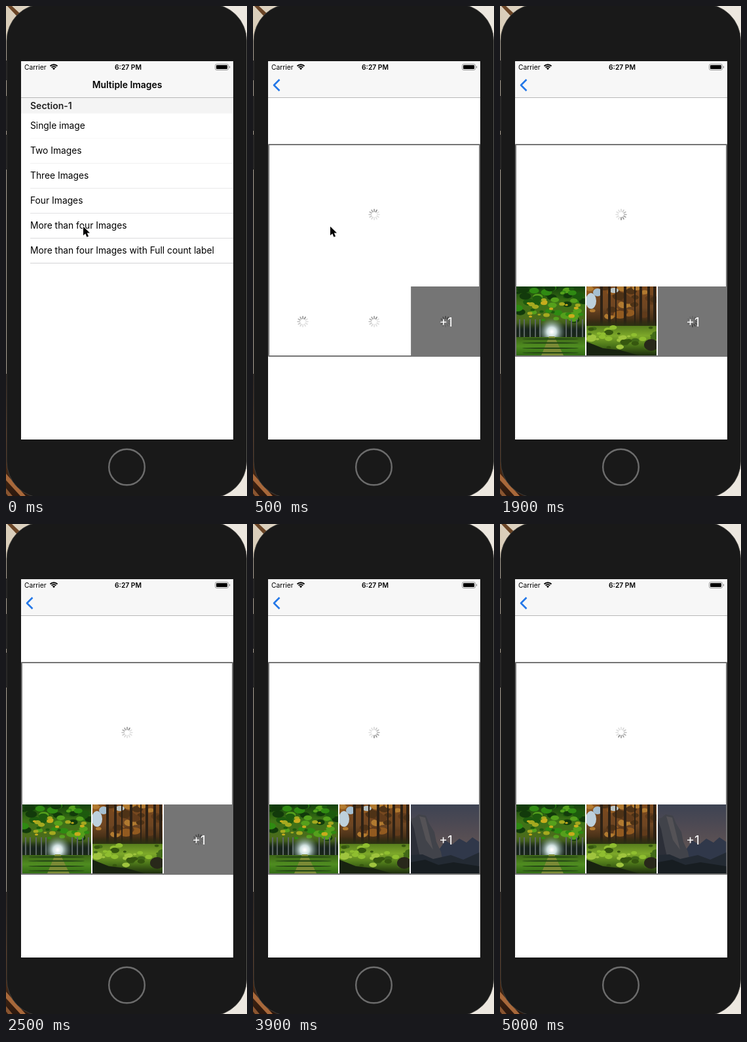
An HTML page with a canvas for the animation above (5100 ms loop, 368 px wide and 746 px high).

```html
<!DOCTYPE html>
<html lang="en">
<head>
<meta charset="utf-8">
<title>Multiple Images</title>
<style>
html, body { margin: 0; width: 368px; height: 746px; overflow: hidden; }
canvas { display: block; width: 368px; height: 746px; }
</style>
</head>
<body>
<canvas id="stage"></canvas>
<script>
const W = 368, H = 746, LOOP = 5100, STEP = 100;
const SCREEN = { x: 23, y: 84, w: 324, h: 576 };
const ROWS = ['Single image', 'Two Images', 'Three Images', 'Four Images',
  'More than four Images', 'More than four Images with Full count label'];
const ROW_TOP = 163.5, ROW_H = 38, PICKED = 4;
const PUSH = { start: 100, length: 462 };
const LOADED = { avenue: 700, meadow: 1500, valley: 3700 };
const CURSOR_END = 1600;
const FRAME_GRAY = '#757575';

const canvas = document.getElementById('stage');
const ctx = canvas.getContext('2d');
const dpr = window.devicePixelRatio || 1;
canvas.width = W * dpr;
canvas.height = H * dpr;

function rect(x, y, w, h, fill) {
  ctx.fillStyle = fill;
  ctx.fillRect(x, y, w, h);
}

function text(str, x, y, size, weight = 400, color = '#000', align = 'left') {
  ctx.font = `${weight} ${size}px Inter, Roboto, sans-serif`;
  ctx.textAlign = align;
  ctx.fillStyle = color;
  ctx.fillText(str, x, y);
}

function poly(fill, ...pts) {
  ctx.beginPath();
  for (let i = 0; i < pts.length; i += 2) ctx.lineTo(pts[i], pts[i + 1]);
  ctx.closePath();
  ctx.fillStyle = fill;
  ctx.fill();
}

function oval(x, y, rx, ry, fill) {
  ctx.beginPath();
  ctx.ellipse(x, y, rx, ry, 0, 0, 7);
  ctx.fillStyle = fill;
  ctx.fill();
}

function fade(x0, y0, x1, y1, ...colors) {
  const g = ctx.createLinearGradient(x0, y0, x1, y1);
  colors.forEach((c, i) => g.addColorStop(i / (colors.length - 1), c));
  return g;
}

function rounded(x, y, w, h, r) {
  ctx.beginPath();
  ctx.roundRect(x, y, w, h, r);
}

function layer(draw) {
  ctx.save();
  draw();
  ctx.restore();
}

function randomizer(seed) {
  return () => (seed = seed * 16807 % 2147483647) / 2147483647;
}

// Soft patches scattered over a box.
function patches(seed, count, box, size, colors) {
  const rnd = randomizer(seed), [x, y, w, h] = box;
  for (let i = 0; i < count; i++) {
    const s = size * (0.5 + rnd());
    oval(x + rnd() * w, y + rnd() * h, s, s * 0.6, colors[i % colors.length]);
  }
}

function tile(x, w, draw) {
  layer(() => {
    ctx.beginPath();
    ctx.rect(x, 427, w, 105);
    ctx.clip();
    ctx.translate(x, 427);
    draw(w);
  });
}

function avenue(w) {
  rect(0, 0, w, 105, fade(0, 0, 0, 75, '#14400c', '#3d7416', '#4b6b1c', '#1c2a1c'));
  patches(41, 50, [0, 0, w, 52], 6, ['#2f8a12', '#123a0b', '#55a01c', '#1d5a0e']);
  patches(97, 16, [12, 20, 85, 28], 4.5, ['#c8ac1c', '#a5a91f']);
  rect(0, 56, w, 22, fade(0, 56, 0, 78, 'rgba(14,26,20,0)', '#17231d', '#1a2818'));
  for (const x of [4, 11, 20, 28, 35, 75, 83, 91, 100]) rect(x, 50, 2, 27, '#5c6664');
  const glow = ctx.createRadialGradient(54, 69, 1, 54, 69, 21);
  glow.addColorStop(0, '#ffffff');
  glow.addColorStop(0.3, '#cfe0df');
  glow.addColorStop(1, 'rgba(110,145,130,0)');
  rect(30, 48, 48, 30, glow);
  rect(0, 77, w, 28, fade(0, 77, 0, 105, '#3d6517', '#4f8d20', '#326b14'));
  poly('#7a8a35', 50, 76, 58, 76, 72, 105, 38, 105);
  for (const y of [80, 86, 94, 101]) oval(52, y, 43, 1.1, '#254715');
}

function meadow(w) {
  rect(0, 0, w, 64, fade(0, 0, 0, 64, '#7d4a1d', '#6d4522', '#29200f'));
  patches(23, 34, [0, 0, w, 46], 7, ['#925a20', '#4e3216', '#b17a30', '#613b1b']);
  oval(7, 22, 8, 12, '#bdd0dc');
  oval(17, 9, 7, 6, '#a6bfd0');
  oval(42, 6, 7, 4, '#b8c3c5');
  for (const x of [21, 33, 44, 57, 73, 81, 93, 102]) rect(x, 0, x % 3 ? 2 : 4, 60, '#2d2115');
  rect(0, 49, w, 14, fade(0, 49, 0, 63, 'rgba(35,42,15,0)', '#303d13'));
  rect(0, 60, w, 45, fade(0, 60, 0, 105, '#577d1d', '#7da82a', '#4b7519', '#1d2d0e'));
  patches(67, 34, [0, 61, w, 32], 5, ['#8fbe30', '#426a18', '#9fc43e', '#36570f']);
  poly('#182310', 0, 84, 25, 94, 52, 97, 80, 105, 0, 105);
  oval(99, 89, 11, 9, '#28281a');
}

function valley(w) {
  rect(0, 0, w, 105, fade(0, 0, 0, 75, '#3d4353', '#514b53', '#625654'));
  poly('#30384a', 42, 70, 53, 55, 63, 61, 74, 52, 85, 58, 94, 50, w, 57, w, 105, 30, 105);
  poly('#41434a', 0, 22, 6, 20, 12, 15, 23, 17, 28, 29, 36, 42, 39, 57, 46, 72, 49, 88, 0, 92);
  poly('#2c2f38', 0, 24, 5, 37, 10, 62, 16, 88, 0, 92);
  poly('#545256', 13, 18, 22, 20, 27, 40, 34, 69, 23, 54);
  poly('#232a33', 0, 77, 18, 76, 34, 83, 61, 77, 80, 84, w, 73, w, 105, 0, 105);
  poly('#171d21', 0, 88, 22, 84, 42, 92, 65, 88, w, 94, w, 105, 0, 105);
}

function spinner(x, y, t) {
  const head = Math.round(4 + t / 1000 * 12);
  ctx.lineWidth = 1.6;
  ctx.lineCap = 'round';
  for (let i = 0; i < 12; i++) {
    const a = (head - i) * Math.PI / 6, c = Math.cos(a), s = Math.sin(a);
    const shade = Math.min(222, 135 + i * 13);
    ctx.strokeStyle = `rgb(${shade},${shade},${shade})`;
    ctx.beginPath();
    ctx.moveTo(x + c * 4.6, y + s * 4.6);
    ctx.lineTo(x + c * 8, y + s * 8);
    ctx.stroke();
  }
}

function listView(picked) {
  rect(23, 84, 324, 576, '#fff');
  rect(23, 139, 324, 24.5, '#f4f4f4');
  text('Section-1', 37, 157, 14, 600, '#222');
  if (picked) rect(23, ROW_TOP + PICKED * ROW_H, 324, ROW_H, '#d0d0d0');
  ROWS.forEach((label, i) => {
    const top = ROW_TOP + i * ROW_H;
    text(label, 37, top + 23.5, 13.8);
    rect(37, Math.round(top + ROW_H) - 1, 310, 1, `rgba(90,90,96,${0.04 + i * 0.045})`);
  });
}

function galleryView(t) {
  rect(23, 84, 324, 576, '#fff');
  ctx.strokeStyle = FRAME_GRAY;
  ctx.lineWidth = 2;
  ctx.strokeRect(24, 211, 322, 322);
  spinner(185, 317.5, t);
  if (t < LOADED.avenue) spinner(76, 480.5, t);
  else tile(25, 105, avenue);
  if (t < LOADED.meadow) spinner(185, 480.5, t);
  else tile(132, 107, meadow);
  if (t < LOADED.valley) {
    spinner(294, 480.5, t);
    rect(241, 427, 106, 107, 'rgba(0,0,0,0.54)');
    rect(345, 427, 2, 107, FRAME_GRAY);
    rect(241, 532, 106, 2, FRAME_GRAY);
  } else tile(241, 104.5, valley);
  text('+1', 294.5, 488, 19, 400, '#fff', 'center');
}

function statusBar() {
  text('Carrier', 28, 96.7, 10.3);
  text('6:27 PM', 186.5, 96.7, 10.3, 600, '#000', 'center');
  ctx.strokeStyle = '#000';
  ctx.lineCap = 'butt';
  ctx.lineWidth = 1.9;
  for (const r of [4.8, 7.8]) {
    ctx.beginPath();
    ctx.arc(73, 97, r, -Math.PI * 0.75, -Math.PI * 0.25);
    ctx.stroke();
  }
  ctx.beginPath();
  ctx.moveTo(73, 97.2);
  ctx.arc(73, 97.2, 3, -Math.PI * 0.75, -Math.PI * 0.25);
  ctx.fillStyle = '#000';
  ctx.fill();
  rounded(319.5, 88.5, 20, 9, 2.2);
  ctx.strokeStyle = '#8a8a8a';
  ctx.lineWidth = 0.9;
  ctx.stroke();
  rounded(321, 90, 17, 6, 1);
  ctx.fill();
  rect(341, 91.5, 1, 3, '#777');
}

function navBar(p) {
  rect(23, 84, 324, 55, '#f7f7f7');
  rect(23, 139, 324, 1, '#b7b7b7');
  statusBar();
  layer(() => {
    ctx.globalAlpha = p;
    ctx.strokeStyle = '#2478e8';
    ctx.lineWidth = 2.6;
    ctx.beginPath();
    ctx.moveTo(40.5, 112);
    ctx.lineTo(32, 120.5);
    ctx.lineTo(40.5, 129);
    ctx.stroke();
  });
  layer(() => {
    ctx.globalAlpha = Math.min(1, (1 - p) * 1.3);
    text('Multiple Images', 185 - 149 * p, 125.3, 13.9, 600, '#000', 'center');
  });
}

function cursor() {
  ctx.beginPath();
  for (const [x, y] of [[0, 0], [0, 13.5], [3.2, 10.7], [5.5, 16], [8, 15], [5.8, 9.8], [10, 9.6]])
    ctx.lineTo(118 + x, 335.8 + y);
  ctx.closePath();
  ctx.lineJoin = 'round';
  ctx.strokeStyle = '#fff';
  ctx.lineWidth = 2;
  ctx.stroke();
  ctx.fillStyle = '#000';
  ctx.fill();
}

function phone() {
  rect(0, 0, W, H, fade(0, 0, W, 0, '#d9cdb9', '#f1ece5', '#ece7df'));
  poly('#6b4526', 2, 0, 9, 0, 23, 13, 18, 17);
  rect(0, 560, 60, 186, fade(0, 560, 0, 746, '#21150e', '#6b3d1c', '#2b180e'));
  poly('#a8683a', 0, 712, 30, 746, 22, 746, 0, 722);
  poly('#8a5530', 0, 734, 10, 746, 3, 746, 0, 742);
  rect(0, 83, 2, 30, '#111');
  rect(0, 137, 2, 53, '#111');
  rect(0, 196, 2, 53, '#111');
  rounded(1, -3, 366.5, 752, 56);
  ctx.fillStyle = '#191919';
  ctx.fill();
  ctx.strokeStyle = '#4a4845';
  ctx.lineWidth = 0.8;
  ctx.stroke();
  ctx.beginPath();
  ctx.arc(184.5, 702, 27.3, 0, 7);
  ctx.strokeStyle = '#6c6c6c';
  ctx.lineWidth = 2.4;
  ctx.stroke();
}

function render(t) {
  const x = Math.min(1, Math.max(0, (t - PUSH.start) / PUSH.length));
  const p = 1 - (1 - x) ** 4;
  ctx.setTransform(dpr, 0, 0, dpr, 0, 0);
  phone();
  layer(() => {
    ctx.beginPath();
    ctx.rect(SCREEN.x, SCREEN.y, SCREEN.w, SCREEN.h);
    ctx.clip();
    if (p < 1) {
      layer(() => {
        ctx.translate(-97 * p, 0);
        listView(t >= PUSH.start);
      });
      rect(23, 84, 324, 576, `rgba(0,0,0,${0.125 * p})`);
    }
    if (p > 0) layer(() => {
      ctx.translate(324 * (1 - p), 0);
      if (p < 1) rect(17, 84, 6, 576, fade(17, 0, 23, 0, 'rgba(0,0,0,0)', 'rgba(0,0,0,0.07)'));
      galleryView(t);
    });
    navBar(p);
  });
  if (t < CURSOR_END) cursor();
}

const began = performance.now();
function tick() {
  const t = (performance.now() - began) % LOOP;
  render(Math.floor(t / STEP) * STEP);
  requestAnimationFrame(tick);
}
tick();
</script>
</body>
</html>
```
